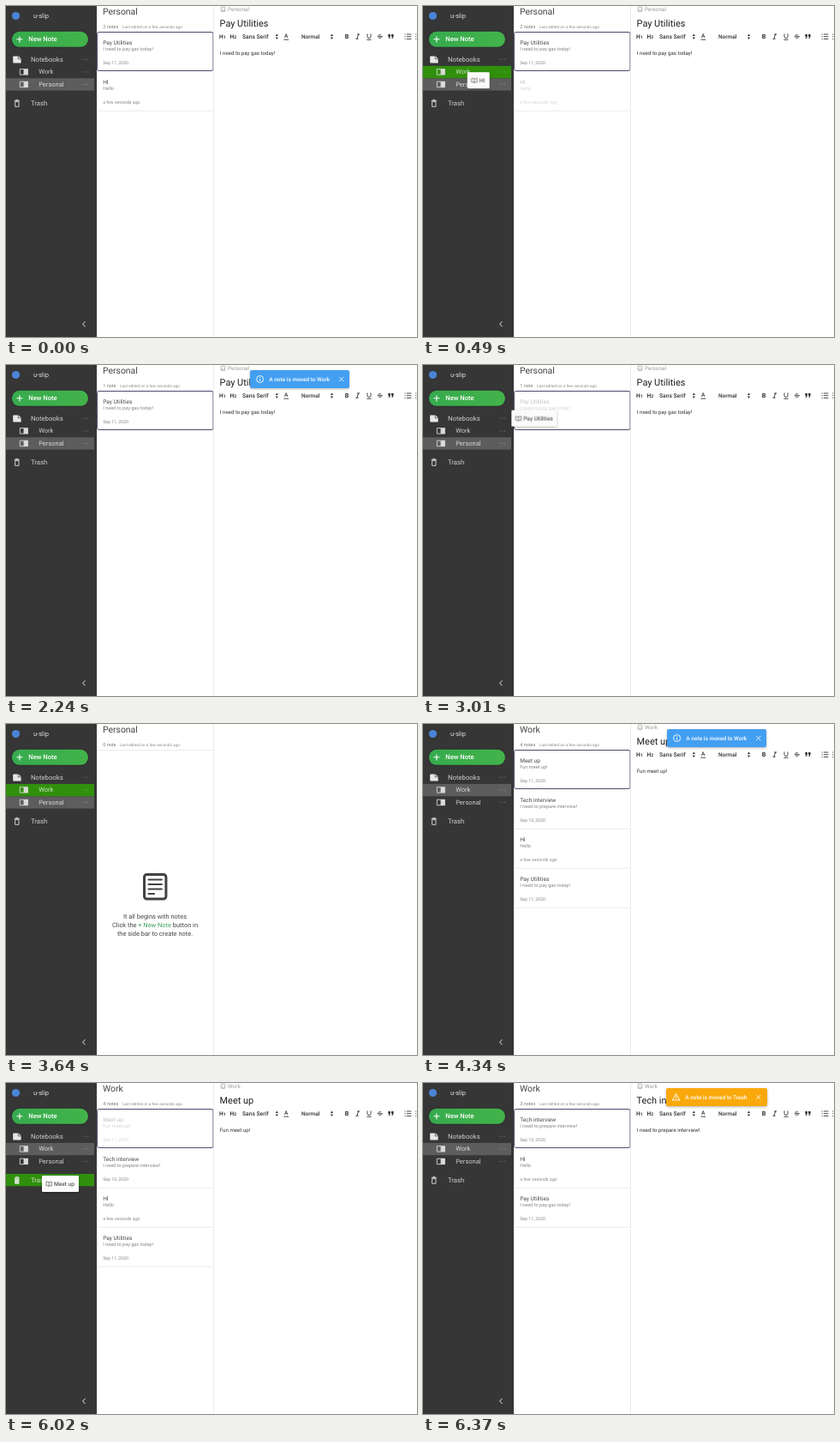
Write an HTML page that moves like this. It is 480 by 386 pixels and loops after 6.44 s.

```html
<!DOCTYPE html>
<html lang="en">
<head>
<meta charset="utf-8">
<title>Notes</title>
<style>
  html, body { margin: 0; width: 100%; height: 100%; overflow: hidden; background: #fff; }
  svg { display: block; width: 480px; height: 386px; font-family: Roboto, "Liberation Sans", sans-serif; }
  text { white-space: pre; text-rendering: geometricPrecision; }
  .line { fill: none; stroke-linecap: round; stroke-linejoin: round; }
  .toast { transform-box: fill-box; transform-origin: center; opacity: 0; }
  .toast rect, .ghost rect { filter: drop-shadow(0 1px 1.5px rgba(0, 0, 0, .3)); }
  .button { filter: drop-shadow(0 .5px 1px rgba(0, 0, 0, .35)); }
</style>
</head>
<body>
<svg id="stage" viewBox="0 0 480 386"></svg>
<script>
const LOOP = 6440, STEP = 70;
const DROP = [1190, 3640, 6090];
const OPEN_WORK = 4340;

// ---- drawing helpers ----
const text = (x, y, size, str, fill = '#444', extra = '') =>
  `<text x="${x}" y="${y}" font-size="${size}" fill="${fill}" ${extra}>${str}</text>`;
const rect = (x, y, w, h, fill, extra = '') =>
  `<rect x="${x}" y="${y}" width="${w}" height="${h}" fill="${fill}" ${extra}/>`;
const line = (d, color, width = 1, extra = '') =>
  `<path class="line" d="${d}" stroke="${color}" stroke-width="${width}" ${extra}/>`;
const show = (from, to, body) => `<g data-show="${from} ${to}">${body}</g>`;
const medium = 'font-weight="500"';

// ---- sidebar ----
const dots = y => [90, 92.7, 95.4].map(x => `<circle cx="${x}" cy="${y}" r=".6" fill="#fff" opacity=".28"/>`).join('');
const book = y => `<g transform="translate(16 ${y})">
  ${line('M.7 1.2H5V7.7H.7Z', '#dadada', .9)}
  <path d="M5 .8H9.9V8.1H5Z" fill="#dadada"/></g>`;
const label = (x, y, str, size = 7.5) => text(x, y, size, str, '#fff', 'opacity=".76"');
const row = (y, fill) => rect(0, y, 103, 14.3, fill);
const GREEN = '#30900c', GREY = '#5d5d5d';

const sidebar = () => `
  ${rect(0, 0, 106, 386, '#363636')}
  <circle cx="11.5" cy="11.5" r="4.6" fill="#4b84d6"/>
  ${text(32, 14, 7.5, 'u-slip', '#e2e2e2')}
  <linearGradient id="button"><stop stop-color="#36ab4e"/><stop offset="1" stop-color="#43b34a"/></linearGradient>
  ${rect(6.8, 29.8, 89.2, 18, 'url(#button)', 'rx="9" class="button"')}
  ${line('M12.8 38.8H19M15.9 35.7V41.9', '#fff', 1.1)}
  ${text(26.3, 41.4, 7.6, 'New Note', '#fff', medium)}
  ${show(0, OPEN_WORK, row(84.3, GREY))}
  ${show(OPEN_WORK, LOOP, row(69.9, GREY))}
  ${show(420, 1330, row(69.9, GREEN))}
  ${show(3150, 3710, row(69.9, GREEN))}
  ${show(5600, 6160, row(106, GREEN))}
  <path d="M9 58.4H14.6L17.6 61.4V66.6H9Q8.2 66.6 8.2 65.8V59.2Q8.2 58.4 9 58.4Z" fill="#e8e8e8"/>
  ${line('M14.2 58.8V61.8H17.3', '#363636', .7)}
  ${label(29, 64.8, 'Notebooks', 7.75)}
  ${book(72.4)}${label(38.2, 79.4, 'Work')}
  ${book(87)}${label(38.2, 94, 'Personal')}
  ${dots(62.2)}${dots(76.9)}${dots(91.4)}
  ${line('M10 110.4H15.6M11.8 109.4H13.8M10.6 112V117.3H15V112Z', '#dedede', .9)}
  ${show(5600, 6160, rect(10.6, 112, 4.4, 5.2, '#cfe3c4'))}
  ${label(29, 115.8, 'Trash', 7.75)}
  ${line('M92.3 368.2L89.6 371L92.3 373.8', '#e4e4e4', 1)}`;

// ---- note list ----
const NOTES = {
  pay: ['Pay Utilities', 'I need to pay gas today!', 'Sep 11, 2020'],
  hi: ['HI', 'Hello', 'a few seconds ago'],
  meet: ['Meet up', 'Fun meet up!', 'Sep 11, 2020'],
  tech: ['Tech interview', 'I need to prepare interview!', 'Sep 10, 2020'],
};

function card(key, i, fade) {
  const y = 30 + i * 46, [title, body, date] = NOTES[key];
  return `<g ${fade && fade.key === key ? `data-fade="${fade.from} ${fade.to}"` : ''}>
    ${text(113.2, y + 14.8, 6.55, title, '#484848')}
    ${text(113.2, y + 22.4, 5.6, body, '#858585')}
    ${text(113.2, y + 38, 5.2, date, '#858585')}</g>
    ${i ? rect(107, y + 45.8, 135, .7, '#e2e2e2')
        : rect(106.6, 30.5, 135.4, 45, 'none', 'rx="2" stroke="#4f496e"')}`;
}

const list = (from, to, name, keys, fade) => show(from, to, `
  ${text(113, 9.8, 10.4, name, '#444')}
  ${text(113.2, 25.6, 5.5, keys.length + (keys.length > 1 ? ' notes' : ' note'), '#777')}
  ${text(keys.length > 1 ? 136 : 133, 25.6, 4.7, 'Last edited on a few seconds ago', '#888')}
  ${rect(106, 30, 136, .7, '#e2e2e2')}
  ${keys.map((key, i) => card(key, i, fade)).join('')}`);

const centred = 'text-anchor="middle"';
const emptyHint = () => show(DROP[1], OPEN_WORK, `
  ${rect(161.5, 175.5, 25.4, 28.6, 'none', 'rx="3" stroke="#424242" stroke-width="3"')}
  ${line('M166.6 181.5H181.8M166.6 187H181.8M166.6 192.5H181.8M166.6 198H173', '#424242', 2.2)}
  ${text(174, 226.8, 7.45, 'It all begins with notes', '#444', centred)}
  ${text(174, 236.8, 7.45, 'Click the <tspan fill="#3d9f5c">+ New Note</tspan> button in', '#444', centred)}
  ${text(174, 246.6, 7.45, 'the side bar to create note.', '#444', centred)}`);

// ---- editor ----
const INK = '#333';
const sorter = x => `<path d="M${x - 1.6} 35L${x} 32.6L${x + 1.6} 35ZM${x - 1.6} 36.6L${x} 39L${x + 1.6} 36.6Z" fill="${INK}"/>`;
const bullets = x => line(`M${x + 2.3} 33H${x + 7}M${x + 2.3} 35.7H${x + 7}M${x + 2.3} 38.4H${x + 7}
  M${x} 33H${x + .3}M${x} 35.7H${x + .3}M${x} 38.4H${x + .3}`, INK, .9);
const heading = (x, n) => text(x, 38, 6.6, `H<tspan font-size="5">${n}</tspan>`, INK, 'font-weight="700"');
const quote = x => `<path d="M${x} 33H${x + 2.6}V35.6L${x + 1.5} 38H${x + .4}L${x + 1.1} 35.8H${x}Z" fill="${INK}"/>`;

const toolbar = () => `
  ${heading(249, 1)}${heading(261.6, 2)}
  ${text(276, 38.2, 6.7, 'Sans Serif', INK, medium)}${sorter(316.3)}
  ${text(325, 37.4, 6.6, 'A', INK, medium)}${line('M324.8 39.2H329.8', INK, .9)}
  ${text(345, 38.2, 6.5, 'Normal', INK, medium)}${sorter(380.5)}
  ${text(395.8, 38.2, 7.2, 'B', INK, 'font-weight="700"')}
  ${line('M410.4 33H412.8M408.8 38.2H411.2M411.7 33L409.9 38.2', INK, .9)}
  ${line('M422 32.8V35.6Q422 37.5 424 37.5T426 35.6V32.8M421.8 39.3H426.2', INK, .9)}
  ${text(434.6, 38.2, 7, 'S', INK)}${line('M434 35.7H439.6', INK, .8)}
  ${quote(446.3)}${quote(450)}
  ${bullets(466)}${bullets(478.6)}`;

const editor = (from, to, name, key) => show(from, to, `
  ${rect(251.2, 1.2, 4.6, 5.2, 'none', 'rx=".6" stroke="#999" stroke-width=".7"')}
  ${line('M251.2 5H255.6', '#999', .6)}
  ${text(259, 6.3, 6.4, name, '#999')}
  ${text(249.6, 23.6, 10.9, NOTES[key][0], '#1d1d1d')}
  ${toolbar()}
  ${text(249.8, 56.8, 6.15, NOTES[key][1], INK)}`);

// ---- drag label and toast ----
const ghost = (from, to, move, width, key) =>
  `<g class="ghost" data-show="${from} ${to}" data-move="${move}">
    ${rect(0, 0, width, 19, '#fbfbfb', 'rx="1"')}
    ${line('M8.2 8V12.3Q6.6 11.3 5 11.8V7.2Q7 6.8 8.2 8Q9.4 6.8 11.4 7.2V11.8Q9.8 11.3 8.2 12.3', '#555', .7)}
    ${text(14, 12, 6.6, NOTES[key][0], INK)}</g>`;

const toast = (x, width, color, icon, place) => `<g class="toast">
  ${rect(x, 6, width, 21, color, 'rx="2"')}
  ${icon}
  ${text(x + 22.3, 18.8, 6.5, 'A note is moved to ' + place, '#fff', medium)}
  ${line('M389.4 14.3L394 18.9M394 14.3L389.4 18.9', '#fff', .8)}</g>`;
const info = `<circle cx="296.6" cy="16.5" r="4" fill="none" stroke="#fff" stroke-width=".9"/>
  ${line('M296.6 16.3V18.6M296.6 14.4V14.5', '#fff', .9)}`;
const warning = line('M295.8 12.6L299.9 20H291.7Z M295.8 15.2V17.3M295.8 18.7V18.8', '#fff', .9);
const BLUE = '#439ff2', AMBER = '#faa90c';

document.getElementById('stage').innerHTML = `
  ${rect(0, 0, 480, 386, '#fff')}
  ${list(0, DROP[0], 'Personal', ['pay', 'hi'], { key: 'hi', from: 70, to: DROP[0] })}
  ${list(DROP[0], DROP[1], 'Personal', ['pay'], { key: 'pay', from: 2870, to: DROP[1] })}
  ${list(DROP[1], OPEN_WORK, 'Personal', [])}
  ${emptyHint()}
  ${list(OPEN_WORK, DROP[2], 'Work', ['meet', 'tech', 'hi', 'pay'], { key: 'meet', from: 5320, to: DROP[2] })}
  ${list(DROP[2], LOOP, 'Work', ['tech', 'hi', 'pay'])}
  ${rect(242, 0, .8, 386, '#e6e6e6')}
  ${editor(0, DROP[1], 'Personal', 'pay')}
  ${editor(OPEN_WORK, DROP[2], 'Work', 'meet')}
  ${editor(DROP[2], LOOP, 'Work', 'tech')}
  ${sidebar()}
  ${ghost(70, DROP[0], '70 630 118 92 42 75', 26, 'hi')}
  ${ghost(2870, DROP[1], '2870 3360 116 48 42 75', 53, 'pay')}
  ${ghost(5320, DROP[2], '5320 5670 112 46 42 108', 43, 'meet')}
  ${toast(285, 116, BLUE, info, 'Work')}
  ${toast(285, 116, BLUE, info, 'Work')}
  ${toast(284, 118, AMBER, warning, 'Trash')}`;

// ---- motion ----
const at = ms => Math.max(0, (ms - 1) / LOOP);

// Each key is [ms, properties, easing]; the whole loop advances in even steps.
function animate(el, keys) {
  const frames = keys.map(([ms, props, easing = 'linear']) => ({ offset: at(ms), easing, ...props }));
  if (frames[0].offset > 0) frames.unshift({ ...frames[0], offset: 0 });
  frames.push({ ...frames[frames.length - 1], offset: 1 });
  el.animate(frames, { duration: LOOP, iterations: Infinity, easing: `steps(${LOOP / STEP})` });
}

function during(el, range, off, on) {
  const [from, to] = range.split(' ').map(Number);
  const key = (ms, opacity) => [ms, { opacity }];
  const before = from > 0 ? [key(from, off)] : [];
  animate(el, [...before, key(from, on), key(to, on), key(to, off)]);
}

const all = (selector, fn) => document.querySelectorAll(selector).forEach(fn);
all('[data-show]', el => during(el, el.dataset.show, 0, 1));
all('[data-fade]', el => during(el, el.dataset.fade, 1, .33));
all('[data-move]', el => {
  const [t0, t1, x0, y0, x1, y1] = el.dataset.move.split(' ').map(Number);
  animate(el, [
    [t0, { transform: `translate(${x0}px, ${y0}px)` }, 'ease-in-out'],
    [t1, { transform: `translate(${x1}px, ${y1}px)` }],
  ]);
});

const pose = (opacity, scale) => ({ opacity, transform: `scale(${scale})` });
const hidden = pose(0, .82), full = pose(1, 1), trace = pose(.1, .81);
const exits = [
  [[2240, full, 'ease-in-out'], [2450, hidden]],
  [[4690, full], [4830, trace], [6020, trace], [6020, hidden]],
  [[LOOP, full]],
];
all('.toast', (el, i) => {
  const start = DROP[i];
  animate(el, [[start, hidden, 'ease-in-out'], [start + 250, full], ...exits[i]]);
});
</script>
</body>
</html>
```
